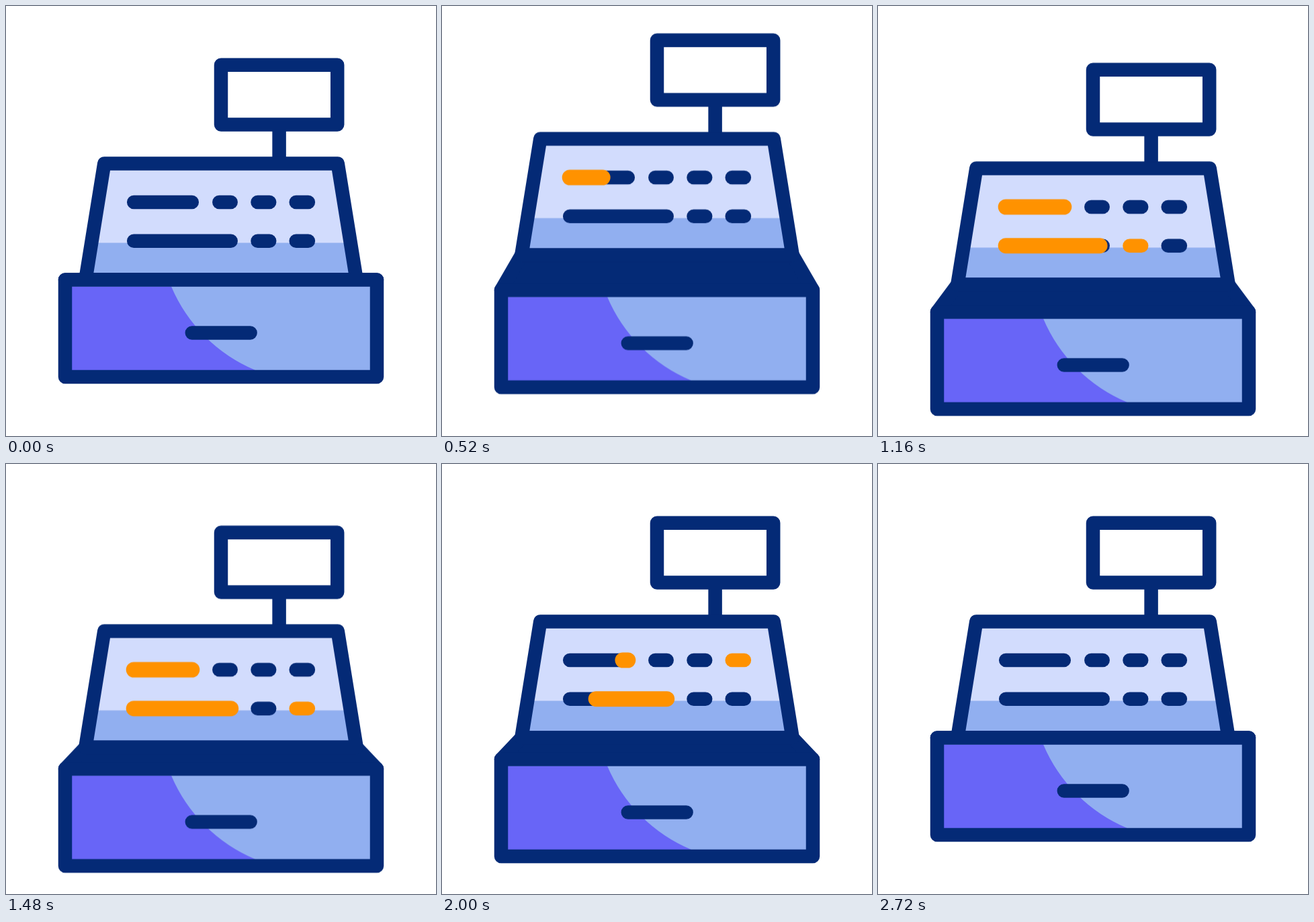
Animation, 640 px wide and 640 px high, one loop 3000 ms. Source, as an HTML page:

```html
<!DOCTYPE html>
<html lang="en">
<head>
<meta charset="utf-8">
<title>Cash register</title>
<style>
  :root { --navy: #042a76; --orange: #ff9200; --soft: cubic-bezier(.5, 0, .5, 1); }
  html, body { margin: 0; width: 100%; height: 100%; overflow: hidden; background: #fff; }
  svg { display: block; width: 100%; height: 100%; }

  .line { fill: none; stroke: var(--navy); stroke-width: 20.5; stroke-linecap: round; stroke-linejoin: round; }
  .joint { fill: var(--navy); animation: stretch 3s linear infinite; }
  .register { animation: bounce 3s var(--soft) infinite; }
  .drawer { animation: slide 3s linear infinite; }
  .key { animation: blink 3s step-end calc(660ms + var(--i) * 408ms) infinite; }
  .bar { stroke: var(--orange); stroke-width: 23; stroke-dasharray: 1 3; animation: 3s var(--soft) infinite; }
  .top { animation-name: sweep-top; }
  .low { animation-name: sweep-low; }

  @keyframes bounce {
    0%, 2.667%, 61.333%, 100% { transform: translateY(0); }
    26.667% { transform: translateY(-51.6px); }
    43.667% { transform: translateY(17.5px); }
  }
  @keyframes slide {
    0%, 6.167%, 83.333%, 100% { transform: translateY(0); }
    22.167% { transform: translateY(74.5px); }
    43%, 66.667% { transform: translateY(32px); }
  }
  /* The joint's lower edge follows the drawer. */
  @keyframes stretch {
    0%, 6.167%, 83.333%, 100% { d: path("M118.3 407.5L521.7 407.5L552 407.5L88 407.5Z"); }
    22.167% { d: path("M118.3 407.5L521.7 407.5L552 482L88 482Z"); }
    43%, 66.667% { d: path("M118.3 407.5L521.7 407.5L552 439.5L88 439.5Z"); }
  }
  @keyframes blink {
    0% { stroke: var(--orange); }
    13.6%, 100% { stroke: var(--navy); }
  }
  @keyframes sweep-top {
    0%, 8.133% { stroke-dashoffset: 1; visibility: hidden; }
    25.467%, 53.4% { stroke-dashoffset: 0; visibility: visible; }
    70.733%, 100% { stroke-dashoffset: -1; visibility: hidden; }
  }
  @keyframes sweep-low {
    0%, 23.867% { stroke-dashoffset: 1; visibility: hidden; }
    41.2%, 60.167% { stroke-dashoffset: 0; visibility: visible; }
    77.5%, 100% { stroke-dashoffset: -1; visibility: hidden; }
  }
</style>
</head>
<body>
<svg viewBox="0 0 640 640">
  <g class="register">
    <path class="line" d="M320 87.8H493.2V176.6H320ZM406.6 176.6V234.4"/>

    <path fill="#d2dcfd" d="M146.3 234.4H493.7L521.7 407.5H118.3Z"/>
    <path fill="#91aff0" d="M127.2 352.5H512.8L521.7 407.5H118.3Z"/>
    <path class="line joint" d="M118.3 407.5L521.7 407.5L552 407.5L88 407.5Z"/>
    <path class="line" d="M146.3 234.4H493.7L521.7 407.5H118.3Z"/>

    <path class="line" d="M190.2 292H276.8M190.2 349.7H334.7"/>
    <path class="line bar top" pathLength="1" d="M190.2 292H276.8"/>
    <path class="line bar low" pathLength="1" d="M190.2 349.7H334.7"/>

    <path class="line key" style="--i:0" d="M317.3 292H334.7"/>
    <path class="line key" style="--i:1" d="M374.5 349.7H392.2"/>
    <path class="line key" style="--i:2" d="M431.7 349.7H449.9"/>
    <path class="line key" style="--i:3" d="M431.7 292H449.9"/>
    <path class="line key" style="--i:4" d="M374.5 292H392.2"/>

    <g class="drawer">
      <path fill="#91aff0" d="M88 407.5H552V552H88Z"/>
      <path fill="#6865f7" d="M88 417.5H246A234 234 0 0 0 371 542V552H88Z"/>
      <path class="line" d="M88 407.5H552V552H88ZM276.8 486.6H363.6"/>
    </g>
  </g>
</svg>
</body>
</html>
```
